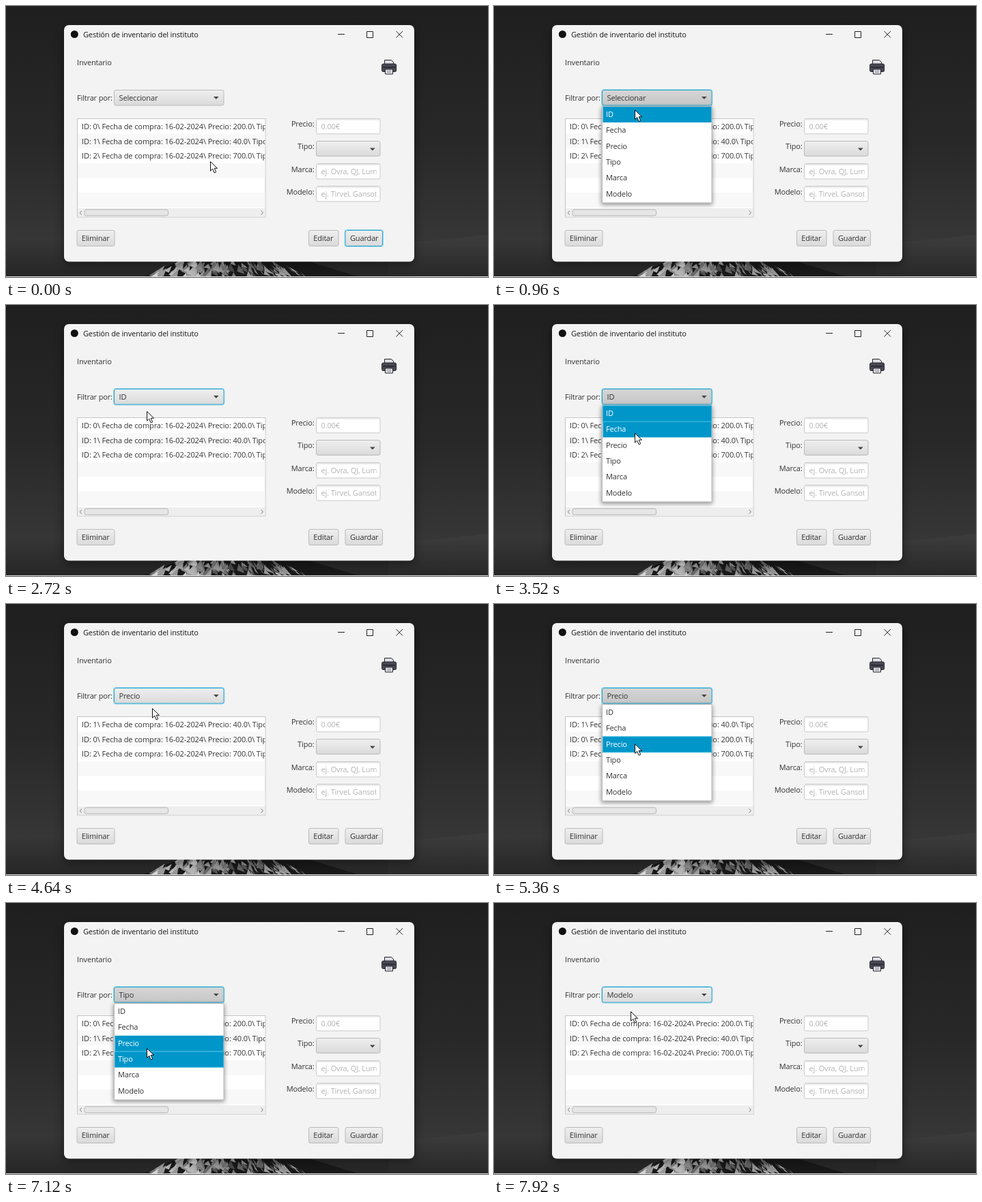
An HTML page that plays this animation: 706x398 px, repeating every 8000 ms.

```html
<!DOCTYPE html>
<html lang="es">
<head>
<meta charset="utf-8">
<title>Inventario</title>
<style>
html, body { margin: 0; width: 100%; height: 100%; overflow: hidden; background: #222; }
svg { display: block; width: 706px; height: 398px; }
text { font: 11px "Open Sans", "Noto Sans", sans-serif; letter-spacing: -.15px; fill: #333; white-space: pre; }
#rows text { letter-spacing: -.09px; }
.hint { fill: #b2b2b2; }
.field { fill: #fff; stroke: #cacaca; }
.btn { fill: url(#btn); stroke: #bababa; }
.focus .btn { stroke: #1fa6d2; }
.open .btn { fill: url(#pressed); }
.ring { fill: none; stroke: #039ed3; stroke-opacity: .35; visibility: hidden; }
.focus .ring { visibility: visible; }
</style>
</head>
<body>
<svg viewBox="0 0 706 398">
  <defs>
    <linearGradient id="sky" x2="0" y2="1">
      <stop offset="0" stop-color="#1f1f1f"/>
      <stop offset=".5" stop-color="#282828"/>
      <stop offset=".86" stop-color="#363636"/>
      <stop offset="1" stop-color="#262626"/>
    </linearGradient>
    <linearGradient id="mist" x2="0" y2="1">
      <stop offset="0" stop-color="#3d3d3d"/>
      <stop offset="1" stop-color="#282828"/>
    </linearGradient>
    <linearGradient id="btn" x2="0" y2="1">
      <stop offset="0" stop-color="#efefef"/>
      <stop offset="1" stop-color="#dadada"/>
    </linearGradient>
    <linearGradient id="pressed" x2="0" y2="1">
      <stop offset="0" stop-color="#d6d6d6"/>
      <stop offset="1" stop-color="#c6c6c6"/>
    </linearGradient>
    <linearGradient id="inset" x2="0" y2="1">
      <stop offset="0" stop-color="#dedede"/>
      <stop offset="1" stop-color="#fff"/>
    </linearGradient>
    <filter id="soft" x="-10%" y="-10%" width="120%" height="125%"><feGaussianBlur stdDeviation="7"/></filter>
    <filter id="near" x="-10%" y="-10%" width="120%" height="120%"><feGaussianBlur stdDeviation="3"/></filter>
    <clipPath id="listClip"><rect x="105" y="166" width="274.5" height="131"/></clipPath>
    <clipPath id="hintClip"><rect x="460" y="160" width="82.5" height="130"/></clipPath>
  </defs>

  <rect width="706" height="398" fill="url(#sky)"/>
  <path d="M560 349Q630 345 706 336V398H560Z" fill="url(#mist)"/>
  <g id="peak"></g>
  <rect y="397" width="706" height="1" fill="#d8d8d8"/>

  <rect x="84" y="33" width="515" height="347" rx="9" filter="url(#soft)" opacity=".4"/>
  <rect x="85" y="28" width="513" height="347.5" rx="7" fill="#f3f3f3"/>
  <circle cx="100.3" cy="41.5" r="5.5" fill="#111"/>
  <text x="113" y="46" style="fill:#191919">Gestión de inventario del instituto</text>
  <path d="M486 41.5h10M528.5 37.5h9v9h-9zM571.5 37l9.5 9.5m0-9.5l-9.5 9.5" fill="none" stroke="#222"/>

  <text x="104" y="87">Inventario</text>
  <g stroke="#25252c" stroke-linejoin="round">
    <path d="M554.5 86v-6.500h10l3 3v3.500z" fill="#dcdde2"/>
    <rect x="550.6" y="85" width="21" height="11.500" rx="2" fill="#4a4955"/>
    <path d="M552 90h18" stroke-width="1.600"/>
    <rect x="555.5" y="93" width="11" height="7" fill="#e8e9ee"/>
    <path d="M557.5 95.500h7m-7 2.200h7" stroke="#80808c" stroke-width=".9"/>
  </g>

  <text x="104" y="139">Filtrar por:</text>
  <g id="combo">
    <rect class="ring" x="157.500" y="122.500" width="162.500" height="24.500" rx="3.500"/>
    <rect class="btn" x="158.500" y="123.500" width="160.500" height="22.500" rx="2.500"/>
    <text id="value" x="165.500" y="139"></text>
    <path d="M304 133h7.600l-3.800 4z" fill="#444"/>
  </g>

  <rect x="104.500" y="165.500" width="275.500" height="144.500" fill="#fff" stroke="#c4c4c4"/>
  <g id="rows" clip-path="url(#listClip)"></g>
  <rect x="105" y="297" width="274.500" height="12.500" fill="#eee"/>
  <rect x="115" y="299" width="122.500" height="9" rx="2.500" fill="#e6e6e6" stroke="#b4b4b4"/>
  <path d="M111 300.800l-3 2.900 3 2.900m262.500-5.800l3 2.900-3 2.900" fill="none" stroke="#777"/>

  <g id="form"></g>
  <rect class="btn" x="454.500" y="198.500" width="93.500" height="22" rx="2.500"/>
  <path d="M533 208.500h7.600l-3.800 4z" fill="#444"/>
  <g id="hints" clip-path="url(#hintClip)"></g>

  <rect class="btn" x="104" y="329.500" width="55" height="23" rx="2.500"/>
  <text x="110.700" y="345">Eliminar</text>
  <rect class="btn" x="443.500" y="329.500" width="43.500" height="23" rx="2.500"/>
  <text x="450.200" y="345">Editar</text>
  <g id="save">
    <rect class="ring" x="496" y="328.500" width="56.500" height="25" rx="3.500"/>
    <rect class="btn" x="497" y="329.500" width="54.500" height="23" rx="2.500"/>
    <text x="504" y="345">Guardar</text>
  </g>

  <g id="popup">
    <rect x="157" y="149" width="163" height="143" filter="url(#near)" opacity=".4"/>
    <rect x="158.500" y="147.500" width="160.500" height="141.500" fill="#fff" stroke="#bcbcbc"/>
    <g id="items"></g>
  </g>
  <path id="cursor" d="M.5 .5V14.200L3.700 11.200 6.200 17 8.700 15.900 6.200 10.300H10.500Z" fill="#fff" stroke="#111" stroke-linejoin="round"/>
</svg>
<script>
const LOOP = 8000, STEP = 80;
const $ = id => document.getElementById(id);
function add(parent, tag, attrs, text = '') {
  const el = document.createElementNS('http://www.w3.org/2000/svg', tag);
  for (const k in attrs) el.setAttribute(k, attrs[k]);
  el.textContent = text;
  return parent.appendChild(el);
}

const options = ['ID', 'Fecha', 'Precio', 'Tipo', 'Marca', 'Modelo'];
const prices = ['200.0', '40.0', '700.0'];
const TOP = 147.5, ROW = 23.4, LINE = 21.6;

const items = options.map((name, i) => ({
  bar: add($('items'), 'rect', { x: 159.5, y: TOP + ROW * i + .5, width: 159, height: ROW - .4, fill: '#0096c9' }),
  label: add($('items'), 'text', { x: 164, y: 162.8 + ROW * i }, name)
}));
for (let i = 1; i < 6; i += 2) {
  add($('rows'), 'rect', { x: 105, y: 166 + LINE * i, width: 275, height: LINE, fill: '#f8f8f8' });
}
const rows = prices.map((_, i) => add($('rows'), 'text', { x: 111, y: 181 + LINE * i }));

const hints = { Precio: '0.00€', Tipo: '', Marca: 'ej. Ovra, QJ, Lumbo', Modelo: 'ej. Tirvel, Gansot' };
Object.entries(hints).forEach(([name, hint], i) => {
  const y = 165.3 + 33.1 * i;
  add($('form'), 'text', { x: 451.5, y: y + 12, 'text-anchor': 'end' }, name + ':');
  if (!hint) return;
  add($('form'), 'rect', { class: 'field', x: 454.5, y, width: 93.5, height: 22.5, rx: 2.5 });
  add($('form'), 'rect', { x: 455.5, y: y + .5, width: 91.5, height: 3, fill: 'url(#inset)' });
  add($('hints'), 'text', { class: 'hint', x: 461.5, y: y + 15.5 }, hint);
});

// Snowy summit: dark slope, bright streaks fanning out from the top
let seed = 11;
const rand = () => (seed = seed * 16807 % 2147483647) / 2147483647;
add($('peak'), 'path', { d: 'M200 398L255 374H440L518 398Z', fill: '#191919' });
for (let i = 0; i < 110; i++) {
  const y = 370 + rand() * 22, spread = 65 + (y - 370) * 2.2;
  const x = 322 + (rand() * 2 - 1) * spread;
  const lean = (x - 322) / 9 + rand() * 6 - 3, len = 7 + rand() * 10, w = 2 + rand() * 4;
  const v = Math.round((x < 290 ? 110 : 70) + rand() * 110);
  add($('peak'), 'path', { d: `M${x} ${y}l${lean + w} ${len}l${-w * 2} ${-len * .3}Z`, fill: `rgb(${v},${v},${v})` });
}

// Each visit: pointer sets off, popup opens, an option is picked, pointer leaves to rest
const visits = [
  { go: 560, leave: 1600, pick: 1, rest: [222, 148] },
  { go: 2080, leave: 2640, pick: 0, rest: [206, 138] },
  { go: 2960, leave: 4080, pick: 2, rest: [214, 153] },
  { go: 4800, leave: 6080, pick: 3, rest: [219, 134] },
  { go: 6640, leave: 7600, pick: 5, rest: [200, 159] }
];
const PRESS = [206, 136], REACH = 160, BROWSE = 600, RETURN = 320;
const keys = [[0, 299, 228], [80, 299, 228], [80 + RETURN, 190, 137]];
for (const v of visits) {
  v.open = v.go + REACH;
  v.close = v.leave - STEP;
  const item = [PRESS[0], TOP + ROW * (v.pick + .5)];
  keys.push([v.go, ...keys.at(-1).slice(1)], [v.open, ...PRESS],
    [Math.min(v.open + BROWSE, v.close), ...item], [v.leave, ...item], [v.leave + RETURN, ...v.rest]);
}
keys.push([LOOP, ...keys.at(-1).slice(1)]);

function pointer(t) {
  const i = Math.max(1, keys.findIndex(k => k[0] >= t));
  const [t0, x0, y0] = keys[i - 1], [t1, x1, y1] = keys[i];
  const u = (t - t0) / (t1 - t0), k = u * u * (3 - 2 * u);
  return [x0 + (x1 - x0) * k, y0 + (y1 - y0) * k];
}

function draw(time) {
  const t = Math.floor(time % LOOP / STEP) * STEP;
  const [x, y] = pointer(t);
  $('cursor').setAttribute('transform', `translate(${x} ${y})`);

  const used = t >= visits[0].open;
  const open = visits.some(v => t >= v.open && t < v.close);
  const chosen = visits.filter(v => t >= v.close).at(-1)?.pick ?? -1;
  $('value').textContent = options[chosen] || 'Seleccionar';
  $('save').setAttribute('class', used ? '' : 'focus');
  $('combo').setAttribute('class', (used ? 'focus' : '') + (open ? ' open' : ''));
  $('popup').style.display = open ? '' : 'none';

  const hover = Math.floor((y - TOP) / ROW);
  items.forEach(({ bar, label }, i) => {
    const on = i === hover || i === chosen;
    bar.style.display = on ? '' : 'none';
    bar.style.stroke = i === chosen ? '#2fb4e0' : 'none';
    label.style.fill = on ? '#fff' : '#333';
  });

  const order = [0, 1, 2];
  if (options[chosen] === 'Precio') order.sort((a, b) => prices[a] - prices[b]);
  order.forEach((id, i) => {
    rows[i].textContent = `ID: ${id}\\ Fecha de compra: 16-02-2024\\ Precio: ${prices[id]}\\ Tipo: `;
  });
}

const start = performance.now();
function tick() {
  draw(performance.now() - start);
  requestAnimationFrame(tick);
}
tick();
</script>
</body>
</html>
```
